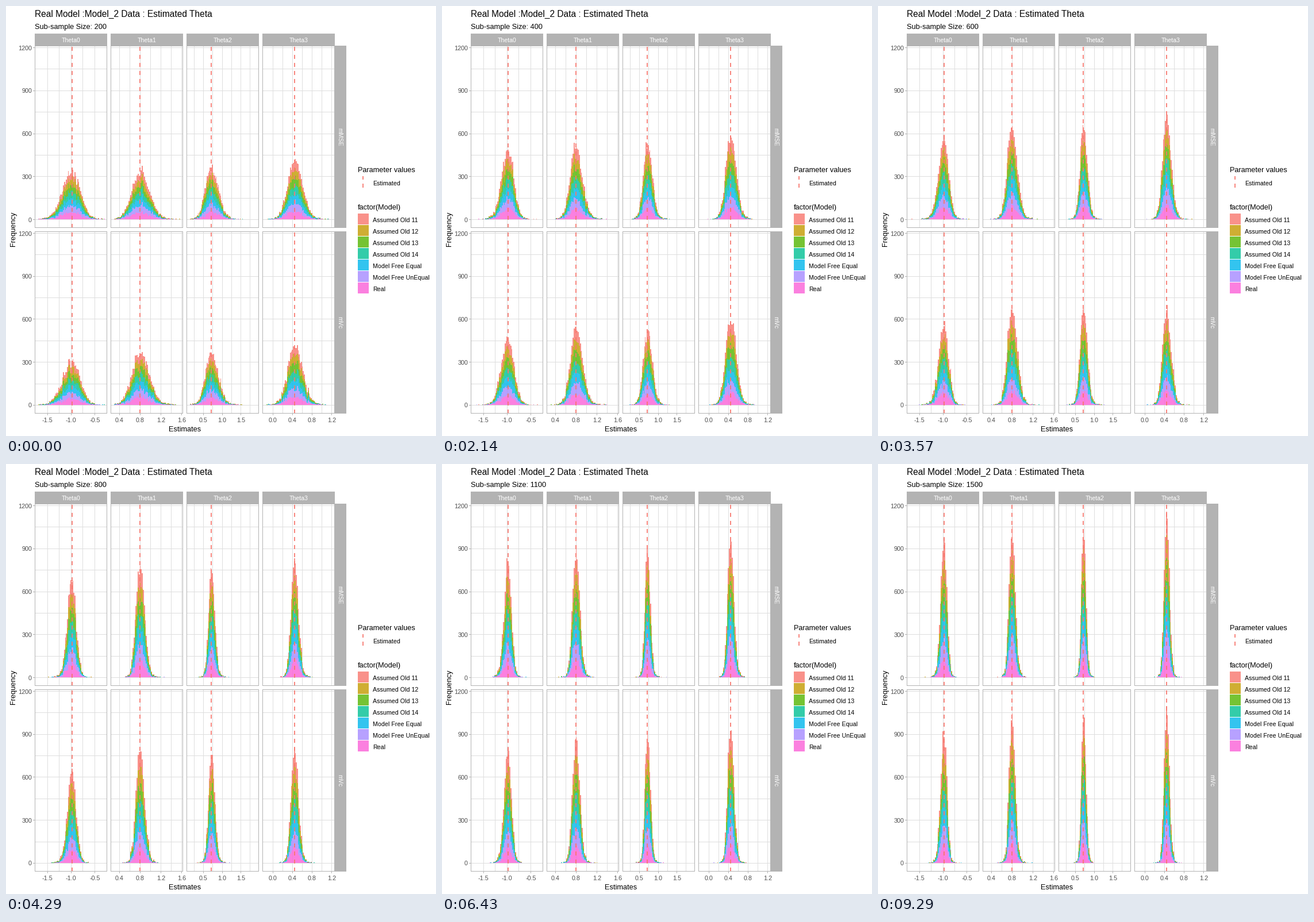
Write a matplotlib script that moves like this. It is 748 by 748 pixels and loops after 10000 ms.

```python
import numpy as np
import matplotlib.pyplot as plt
from matplotlib.animation import FuncAnimation
from matplotlib.collections import PolyCollection
from matplotlib.patches import Rectangle

np.random.seed(7)

SIZE, DPI = 748, 64
PT = 72 / DPI  # points per pixel
STEPS = 14
GREY, GRID, RED = "#B3B3B3", "#DEDEDE", "#F8766D"
MODELS = {
    "Assumed Old 11": "#F8766D", "Assumed Old 12": "#C49A00",
    "Assumed Old 13": "#53B400", "Assumed Old 14": "#00C094",
    "Model Free Equal": "#00B6EB", "Model Free UnEqual": "#A58AFF",
    "Real": "#FB61D7",
}
COLORS = list(MODELS.values())
BIN = 0.02
Y_SCALE = 299 / 1200
ROWS = [("mMSE", 69, 371), ("mVc", 392, 694)]  # label, panel top, zero line
PANEL_W, PANEL_H = 126, 317

# left edge, anchor value, its pixel, pixels per unit, major ticks,
# minor ticks, estimate, spread in pixels at n = 1, side of the long tail
COLS = [
    (50, -1.0, 113.3, 82.5, (-1.5, -1.0, -0.5), (-1.25, -0.75), 115, 212, -1),
    (182, 0.8, 233.5, 90.0, (0.4, 0.8, 1.2, 1.6), (0.6, 1.0, 1.4), 233, 207, 1),
    (314, 1.0, 376.0, 65.3, (0.5, 1.0, 1.5), (0.25, 0.75, 1.25, 1.75), 357.5, 155, 1),
    (446, 0.4, 498.3, 85.5, (0.0, 0.4, 0.8, 1.2), (-0.2, 0.2, 0.6, 1.0), 502, 178, 1),
]

# tallest bar of each panel at a few sub-sample sizes
SIZES = np.array([200, 500, 700, 900, 1100, 1300, 1500])
PEAKS = np.array([
    [[363, 527, 652, 700, 829, 868, 973], [375, 596, 696, 865, 920, 1001, 1057],
     [380, 600, 708, 813, 920, 993, 1033], [420, 652, 808, 848, 953, 1053, 1157]],
    [[321, 545, 618, 694, 802, 822, 918], [369, 622, 702, 858, 878, 1031, 1043],
     [370, 590, 746, 758, 914, 990, 1031], [417, 642, 746, 867, 926, 1035, 1095]],
])

plt.rcParams["font.family"] = "Liberation Sans"
fig = plt.figure(figsize=(SIZE / DPI, SIZE / DPI), dpi=DPI, facecolor="white")
ax = fig.add_axes([0, 0, 1, 1])
ax.set(xlim=(0, SIZE), ylim=(SIZE, 0))
ax.axis("off")


def rect(x, y, w, h, color, z=1, alpha=1):
    ax.add_patch(Rectangle((round(x), round(y)), w, h, fc=color, lw=0,
                           alpha=alpha, zorder=z, antialiased=False))


def label(x, y, text, size, color="black", ha="left", va="baseline", rot=0):
    return ax.text(x, y, text, fontsize=size * PT, color=color, ha=ha, va=va,
                   rotation=rot, zorder=6)


def dashes(x, bottom, top):
    ax.plot([x, x], [bottom, top], color=RED, lw=1.75 * PT, zorder=4,
            dashes=(4, 4), dash_capstyle="butt")


def draw_panel(col, row):
    left, ref, ref_px, scale, major, minor, est = COLS[col][:7]
    _, top, base = ROWS[row]
    for v in major + minor:
        rect(ref_px + (v - ref) * scale - 0.5, top, 1, PANEL_H, GRID)
    for v in range(0, 1201, 150):
        rect(left, base - v * Y_SCALE, PANEL_W, 1, GRID)
    for x in (left, left + PANEL_W - 1):
        rect(x, top, 1, PANEL_H, GREY, 5)
    for y in (top, top + PANEL_H - 1):
        rect(left, y, PANEL_W, 1, GREY, 5)
    dashes(est, top + PANEL_H, top)


def draw_static():
    label(50, 19, "Real Model :Model_2 Data : Estimated Theta", 15.55)
    label(311, 740, "Estimates", 12.8, ha="center")
    label(13, 388, "Frequency", 12.8, ha="center", va="center", rot=90)
    for r, (name, top, base) in enumerate(ROWS):
        rect(572, top, 20, PANEL_H, GREY)
        label(580.5, top + PANEL_H / 2, name, 10.5, "white", "center", "center", 270)
        for v in range(0, 1201, 300):
            y = base - v * Y_SCALE
            rect(47, y, 3, 1, GREY)
            label(45, y + 4.5, str(v), 10.8, "#4D4D4D", "right")
        for c in range(4):
            draw_panel(c, r)
    for c, (left, ref, ref_px, scale, major, *_) in enumerate(COLS):
        rect(left, 48, PANEL_W, 21, GREY)
        label(left + PANEL_W / 2, 63, f"Theta{c}", 10.5, "white", "center")
        for v in major:
            x = ref_px + (v - ref) * scale
            rect(x - 0.5, 709, 1, 3, GREY)
            label(x, 724, f"{v:.1f}", 10.8, "#4D4D4D", "center")

    label(612, 289, "Parameter values", 12.75)
    dashes(621.5, 316, 296)
    label(638, 312, "Estimated", 10.6)
    label(612, 354, "factor(Model)", 12.75)
    for i, (name, color) in enumerate(MODELS.items()):
        rect(612, 361 + 20 * i, 19, 19, color, alpha=0.8)
        label(638, 375.5 + 20 * i, name, 10.6)


def bell(d, s):
    return np.exp(-0.5 * (d / s) ** 2)


def histogram(col, row, n):
    """Bin edges in pixels and the counts of every model per bin."""
    left, ref, ref_px, scale, _, _, est, spread, side = COLS[col]
    first = np.ceil((ref + (left + 6 - ref_px) / scale) / BIN)
    k = np.arange(first, first + 114 / scale / BIN)
    mid = ref_px + (k * BIN - ref) * scale
    edges = np.append(mid - BIN * scale / 2, mid[-1] + BIN * scale / 2)

    z = (mid - est) / (spread / np.sqrt(n))
    shape = 0.94 * bell(z, 1 + 0.05 * side * np.sign(z))
    shape += 0.06 * bell(z - 0.5 * side, 1.5)
    peak = np.interp(n, SIZES, PEAKS[row, col] / np.sqrt(SIZES)) * np.sqrt(n)
    counts = np.random.poisson(0.95 * peak * shape / 7, (7, len(mid)))
    return np.round(edges), counts * (peak / counts.sum(axis=0).max())


def bars(col, row, n):
    edges, counts = histogram(col, row, n)
    base = ROWS[row][2]
    above = np.cumsum(counts[::-1], axis=0)[::-1]
    high = np.round(base - above * Y_SCALE)
    low = np.round(base - (above - counts) * Y_SCALE)
    high = np.minimum(high, low - 1)  # a filled bin is at least a pixel tall
    verts, fills = [], []
    for m, b in np.argwhere(counts > 0):
        x0, x1, y0, y1 = edges[b], edges[b + 1], low[m, b], high[m, b]
        verts.append([(x0, y0), (x0, y1), (x1, y1), (x1, y0)])
        fills.append(COLORS[m])
    return verts, fills


draw_static()
subtitle = label(50, 40, "", 12.8)
panels = [(c, r) for r in range(2) for c in range(4)]
stacks = [PolyCollection([], linewidths=0, antialiaseds=False, alpha=0.8, zorder=3)
          for _ in panels]
for stack in stacks:
    ax.add_collection(stack, autolim=False)

# every step is drawn from the seeded generator once, up front
steps = [[bars(c, r, 200 + 100 * i) for c, r in panels] for i in range(STEPS)]


def update(i):
    subtitle.set_text(f"Sub-sample Size: {200 + 100 * i}")
    for stack, (verts, fills) in zip(stacks, steps[i]):
        stack.set_verts(verts)
        stack.set_facecolor(fills)
    return [subtitle, *stacks]


anim = FuncAnimation(fig, update, frames=STEPS, interval=10000 / STEPS,
                     init_func=lambda: update(0), repeat=True, repeat_delay=0)
plt.show()
```
